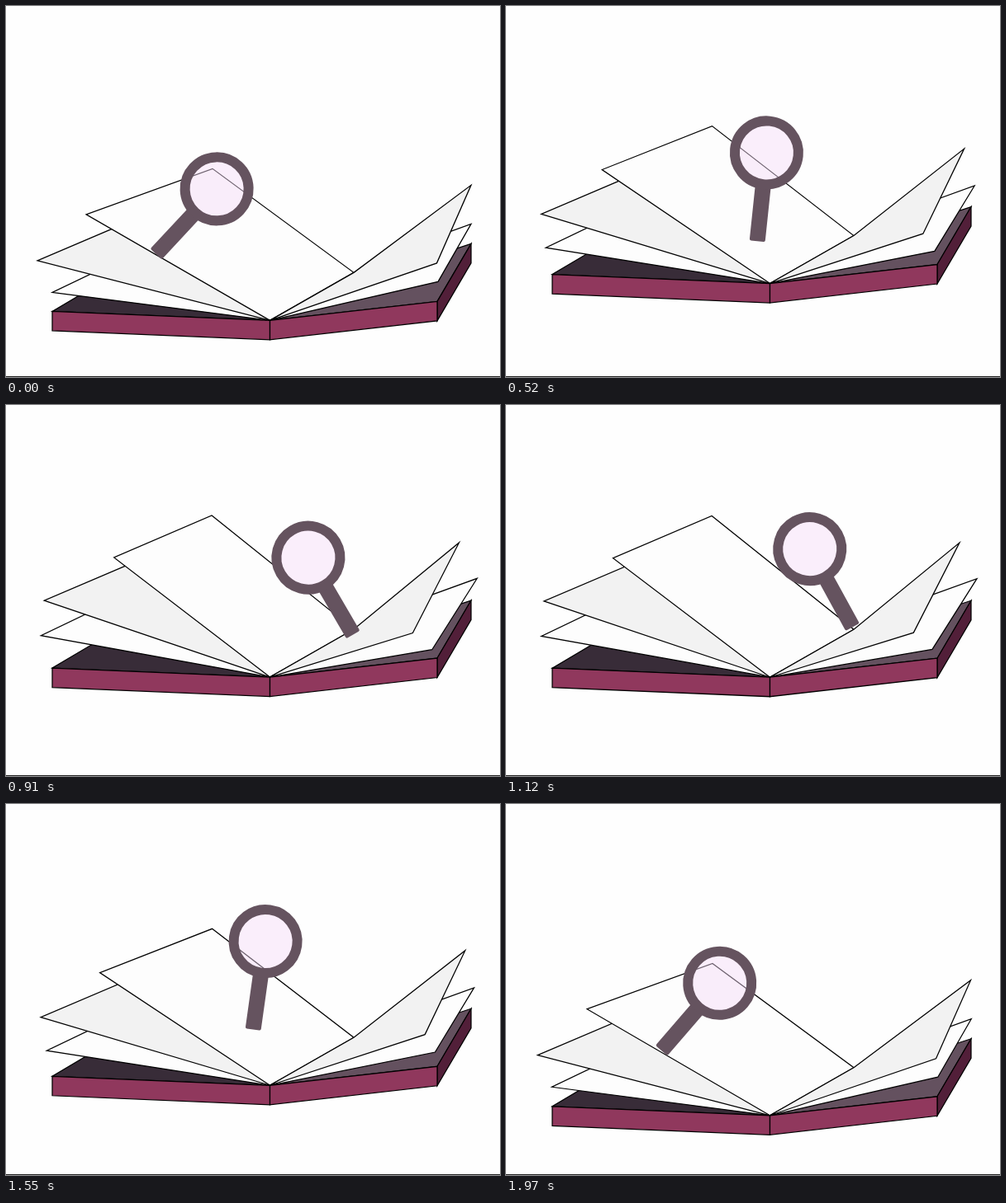
Recreate the animation shown at these times as an HTML page with a canvas. Size 598 px wide and 450 px high, loop 2000 ms.

```html
<!DOCTYPE html>
<html lang="en">
<head>
<meta charset="utf-8">
<title>Book and magnifier</title>
<style>
html, body { margin: 0; width: 100%; height: 100%; overflow: hidden; background: #fefefe; }
canvas { display: block; }
</style>
</head>
<body>
<canvas id="stage" width="598" height="450"></canvas>
<script>
const ctx = document.getElementById('stage').getContext('2d');
const HALF = 1000, THICKNESS = 23.5;
const WHITE = '#fdfdfd', GREY = '#f2f2f2', COVER = '#90385d', SIDE = '#521f39';

function poly(fill, ...points) {
  ctx.beginPath();
  for (const p of points) ctx.lineTo(...p);
  ctx.closePath();
  ctx.fillStyle = fill;
  ctx.fill();
  ctx.stroke();
}

const offset = ([x, y], dx, dy) => [x + dx, y + dy];
const below = p => offset(p, 0, THICKNESS);
const wall = (fill, a, b) => poly(fill, a, b, below(b), below(a));

// All corners are relative to the spine height; open runs from 0 (low) to 1 (high).
function drawBook(open) {
  const move = (x, y, dx, dy) => [x + dx * open, y + dy * open];
  const spine = [319.5, 0], fold = [421, -58];
  const left = [56, -11], right = [522, -23], far = [563, -93];
  ctx.strokeStyle = '#000';
  ctx.lineWidth = 1.25;

  const lowTip = move(56, -34, -15, -18);
  const midTip = move(38, -72.5, 9, -22.5);
  const topTip = move(97, -128.5, 37, -18.3);
  poly('#382c38', spine, left, offset(left, 64, -38));
  poly(WHITE, spine, lowTip, offset(lowTip, 100, -48));
  poly(GREY, spine, midTip, offset(midTip, 150, -64));
  poly(WHITE, spine, topTip, move(250, -184, -1, -13.3), fold);

  const rightTip = move(563, -117, 8, -3);
  poly('#64515f', spine, right, far, offset(far, -73, 24));
  poly(WHITE, spine, move(523, -47, -8, 15), rightTip, offset(rightTip, -80, 29));
  poly(GREY, spine, move(521.5, -69.5, -32, 17.5), move(563, -164, -16, 1), fold);

  wall(SIDE, right, far);
  wall(COVER, left, spine);
  wall(COVER, spine, right);
}

// Cubic paths of the lens: x, y, degrees
const start = [255, 222, 43], end = [381, 193, -40];
const rise = [start, [302, 179, 21.4], [321, 159, -2], end];
const fall = [end, [346, 131, -8], [297.5, 167, 17.3], start];

const bezier = ([a, b, c, d], t) => a.map((_, i) => {
  const v = 1 - t;
  return v ** 3 * a[i] + 3 * v * v * t * b[i] + 3 * v * t * t * c[i] + t ** 3 * d[i];
});

function drawMagnifier(x, y, degrees) {
  ctx.translate(x, y);
  ctx.rotate(degrees * Math.PI / 180);
  ctx.fillStyle = ctx.strokeStyle = '#65535f';
  ctx.beginPath();
  ctx.roundRect(-9.5, 40, 19, 68, 2);
  ctx.fill();
  ctx.beginPath();
  ctx.arc(0, 0, 38.5, 0, 2 * Math.PI);
  ctx.fillStyle = 'rgba(244, 217, 247, 0.45)';
  ctx.fill();
  ctx.lineWidth = 12;
  ctx.stroke();
}

function frame(now) {
  const rising = now % (2 * HALF) < HALF;
  const t = now % HALF / HALF;
  const open = rising ? t : 1 - t;
  const drop = (1 - open) ** (rising ? 2.8 : 2.55);

  ctx.fillStyle = '#fefefe';
  ctx.fillRect(0, 0, 598, 450);
  ctx.save();
  ctx.translate(0, 330 + 51.5 * drop);
  drawBook(open);
  ctx.restore();
  ctx.save();
  drawMagnifier(...bezier(rising ? rise : fall, t));
  ctx.restore();
  ctx.fillStyle = '#222';
  ctx.fillRect(0, 449, 598, 1);
  requestAnimationFrame(frame);
}
requestAnimationFrame(frame);
</script>
</body>
</html>
```
